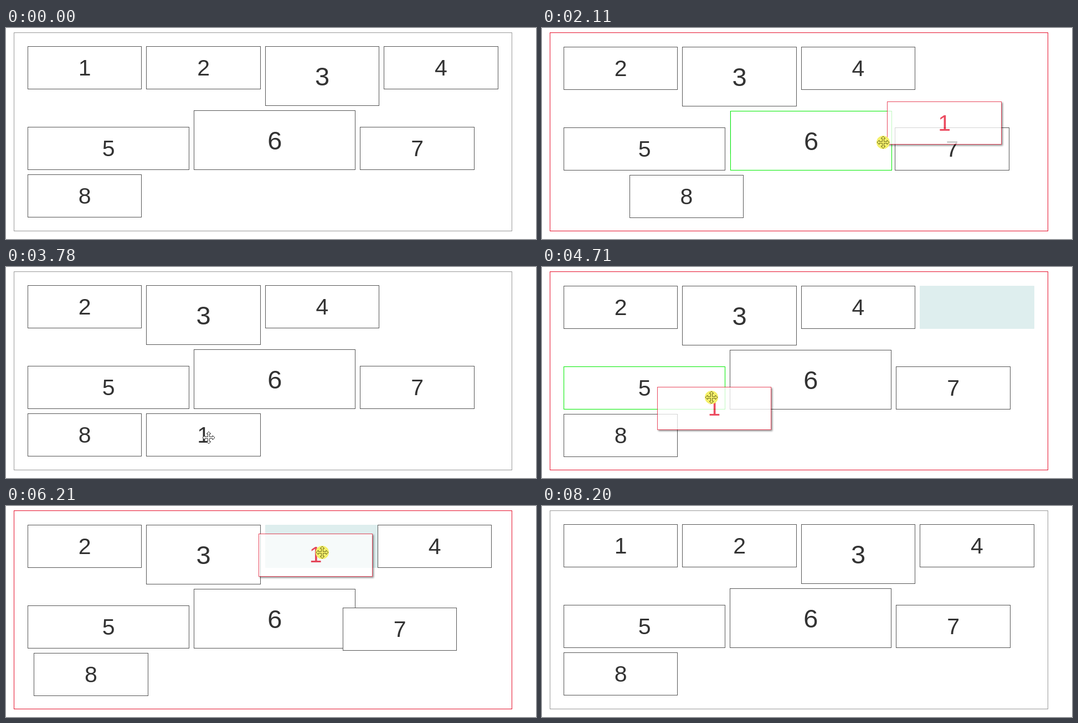
An HTML page for the animation above (8.79 s loop, 957 by 382 pixels).

```html
<!DOCTYPE html>
<html lang="en">
<head>
<meta charset="utf-8">
<title>Sortable tiles</title>
<style>
html, body { margin: 0; width: 100%; height: 100%; overflow: hidden; background: #fff; }
body { position: relative; }
div, svg { position: absolute; box-sizing: border-box; }
#frame { left: 14px; top: 8px; width: 900px; height: 360px; border: 1px solid #999; }
#frame.active { border-color: #e6102b; }
#slot { background: #deeeee; border-radius: 1px; }
.tile {
  display: flex; align-items: center; justify-content: center;
  border: 1px solid #555; background: #fff; color: #333;
  font: 41px "Liberation Sans", Arial, sans-serif;
}
.tall { font-size: 47px; }
.over { border-color: #00ec00; z-index: 1; }
.drag {
  z-index: 2; opacity: .75; color: #e6102b; border-color: #e6102b;
  box-shadow: 2px 2px 3px rgba(0, 0, 0, .6);
}
#cursor { z-index: 3; left: 0; top: 0; width: 40px; height: 40px; overflow: visible; }
#cursor path { fill: #fff; stroke: #333; }
#cursor circle { fill: #f4f06a; }
#cursor.down #move { fill: #f4f06a; stroke: #6d6a20; }
</style>
</head>
<body>
<div id="frame"></div>
<div id="slot"></div>
<svg id="cursor">
  <circle id="halo" r="12"/>
  <path id="move" d="M0-11L4-7H1.5V-1.5H7V-4L11 0L7 4V1.5H1.5V7H4L0 11L-4 7H-1.5V1.5H-7V4L-11 0L-7-4V-1.5H-1.5V-7H-4Z"/>
  <path id="arrow" d="M.5.5V16.5L4.2 13L7 19L9.3 18L6.6 12.2H11.8Z"/>
</svg>
<script>
const LOOP = 8790, SLIDE = 300, LAG = 110, GAP = 8;
const LEFT = 39, TOP = 33, RIGHT = 890;
const SHOW = 40, HIDE = 8200;

// Press and release times, and where tile 1 is held
const drags = [
  { from: 250, to: 3630, dx: 100, dy: 58 },
  { from: 4330, to: 7480, dx: 113, dy: 43 }
];

// Key points of the pointer: time, x, y
const path = [
  [250, 139, 91], [1218, 682, 80], [1470, 762, 82], [1750, 797, 96], [1950, 764, 182],
  [2400, 328, 228], [2700, 206, 229], [3050, 192, 272], [3500, 366, 309],
  [4330, 366, 309], [4620, 318, 256], [4820, 302, 215], [5090, 341, 199],
  [5380, 409, 197], [5700, 530, 165], [5960, 560, 110], [6300, 565, 78],
  [6748, 460, 68], [7000, 327, 86], [7300, 152, 77], [7530, 152, 77],
  [7950, 710, 337], [8080, 710, 337], [8200, 758, 383]
];

const $ = id => document.getElementById(id);
const lerp = (a, b, u) => a + (b - a) * u;
const isTall = n => n == 3 || n == 6;
const widthOf = n => n == 5 || n == 6 ? 292.2 : 206.4;
const heightOf = n => isTall(n) ? 108 : 78;
const heldAt = t => drags.find(d => t >= d.from && t < d.to);
const contains = (n, { x, y }, px, py) =>
  px >= x && px <= x + widthOf(n) && py >= y && py <= y + heightOf(n);

// Wraps tiles into rows; 5 and 7 sit on the bottom of their row
function layout(order) {
  const places = {};
  let x = LEFT, y = TOP, row = [];
  const endRow = () => {
    const tallest = Math.max(...row.map(heightOf));
    for (const n of row)
      if (n == 5 || n == 7) places[n].y += tallest - heightOf(n);
    y += tallest + GAP;
    x = LEFT;
    row = [];
  };
  for (const n of order) {
    if (x + widthOf(n) > RIGHT) endRow();
    places[n] = { x, y };
    row.push(n);
    x += widthOf(n) + GAP;
  }
  endRow();
  return places;
}

// Smooth curve through the key points, at rest where two are equal
function pointer(t) {
  const last = path.length - 1;
  if (t <= path[0][0]) return path[0].slice(1);
  if (t >= path[last][0]) return path[last].slice(1);
  const i = path.findIndex(p => p[0] > t) - 1;
  const slope = (j, k) => {
    const a = path[Math.max(j - 1, 0)], p = path[j], b = path[Math.min(j + 1, last)];
    const resting = [a, b].some(q => q[1] == p[1] && q[2] == p[2]);
    return resting ? 0 : (b[k] - a[k]) / (b[0] - a[0]);
  };
  const a = path[i], b = path[i + 1], d = b[0] - a[0], u = (t - a[0]) / d;
  return [1, 2].map(k =>
    lerp(a[k], b[k], u * u * (3 - 2 * u)) +
    d * u * (1 - u) * ((1 - u) * slope(i, k) - u * slope(i + 1, k)));
}

// While held, tile 1 takes the place of every tile the pointer enters
function findMoves() {
  let order = [1, 2, 3, 4, 5, 6, 7, 8], over;
  const moves = [{ time: 0, places: layout(order) }];
  for (let t = 0; t < LOOP; t += 5) {
    if (!heldAt(t)) continue;
    const { places } = moves.at(-1), [px, py] = pointer(t);
    const hit = order.find(n => n != 1 && contains(n, places[n], px, py));
    if (hit && hit != over) {
      const index = order.indexOf(hit);
      order = order.filter(n => n != 1);
      order.splice(index, 0, 1);
      moves.push({ time: t, places: layout(order) });
    }
    over = hit;
  }
  return moves;
}
const moves = findMoves();

// Each reorder slides a tile from wherever it was at that moment
function position(n, t, i) {
  const { time, places } = moves[i], goal = places[n];
  const u = (t - time) / SLIDE;
  if (!i || u >= 1) return goal;
  const start = position(n, time, i - 1), e = (1 - Math.cos(Math.PI * u)) / 2;
  return { x: lerp(start.x, goal.x, e), y: lerp(start.y, goal.y, e) };
}

function put(el, { x, y }) {
  el.style.left = x + "px";
  el.style.top = y + "px";
}

function size(el, n) {
  el.style.width = widthOf(n) + "px";
  el.style.height = heightOf(n) + "px";
}

function show(id, visible) {
  $(id).style.display = visible ? "" : "none";
}

const tiles = [1, 2, 3, 4, 5, 6, 7, 8].map(n => {
  const el = document.createElement("div");
  el.className = isTall(n) ? "tile tall" : "tile";
  el.textContent = n;
  size(el, n);
  document.body.append(el);
  return { n, el };
});
size($("slot"), 1);

function draw(t) {
  const held = heldAt(t), shift = held ? 1 : 0;
  const now = moves.findLastIndex(m => m.time <= t);
  const [cx, cy] = pointer(t), [lagX, lagY] = pointer(t - LAG);
  const home = moves[now].places[1];
  let onTile = false;

  for (const { n, el } of tiles) {
    const dragged = n == 1 && !!held;
    const base = n == 1 ? home : position(n, t, now);
    const place = dragged
      ? { x: lagX - held.dx, y: lagY - held.dy }
      : { x: base.x, y: base.y + shift };
    const inside = contains(n, place, cx, cy);
    onTile ||= inside;
    put(el, place);
    el.classList.toggle("drag", dragged);
    el.classList.toggle("over", n != 1 && !!held && inside);
  }

  $("frame").classList.toggle("active", !!held);
  put($("slot"), { x: home.x, y: home.y + shift });
  show("slot", held);

  $("cursor").style.transform = `translate(${Math.round(cx)}px, ${Math.round(cy)}px)`;
  $("cursor").classList.toggle("down", !!held);
  show("cursor", t >= SHOW && t < HIDE);
  show("halo", held);
  show("move", held || onTile);
  show("arrow", !held && !onTile);
}

const begin = performance.now();
function tick() {
  draw((performance.now() - begin) % LOOP);
  requestAnimationFrame(tick);
}
tick();
</script>
</body>
</html>
```
